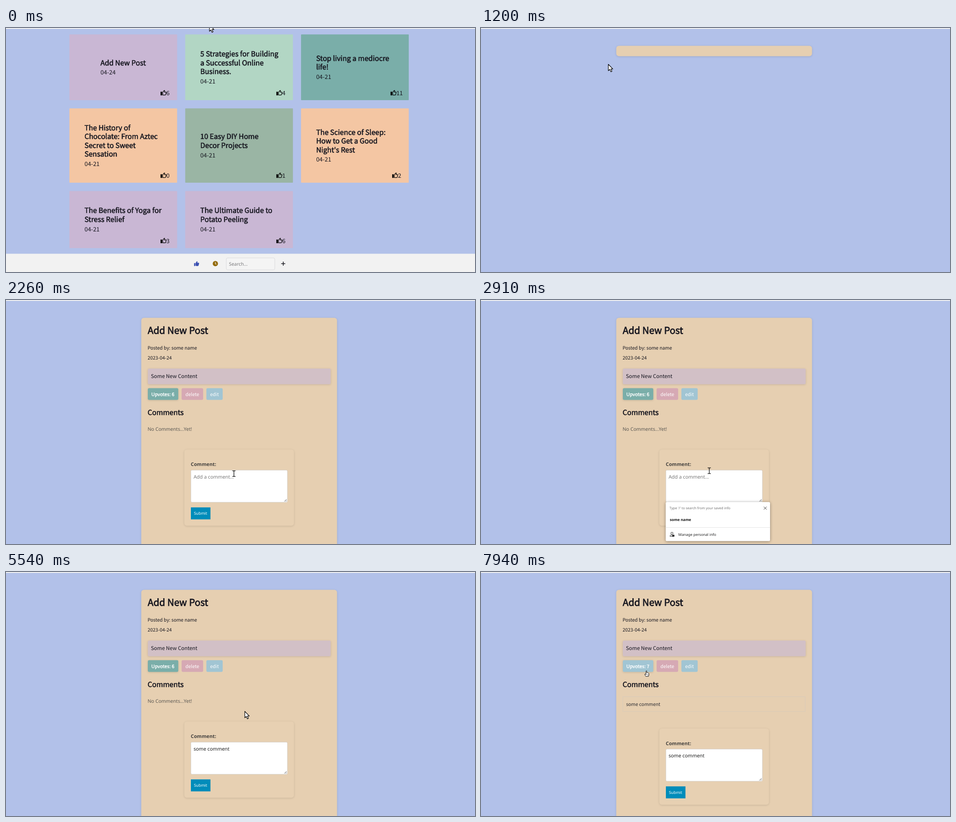
Recreate the animation shown at these times as an HTML page. Size 1035 by 541 pixels, loop 8 s.

```html
<!DOCTYPE html>
<html lang="en">
<head>
<meta charset="utf-8">
<title>Posts</title>
<style>
  html, body { margin: 0; width: 100%; height: 100%; overflow: hidden; background: #b2c1e9; }
  svg { display: block; width: 1035px; height: 541px; }
  text { white-space: pre; text-rendering: geometricPrecision; }
  .page { font-family: "Noto Sans CJK JP", "Noto Sans CJK SC", "Noto Sans JP", sans-serif; }
  .ui { font-family: "Noto Sans", "Open Sans", sans-serif; }
  .soft { filter: drop-shadow(0 1.5px 2px rgba(0, 0, 0, .13)); }
  .popup { filter: drop-shadow(0 1.5px 3px rgba(0, 0, 0, .4)); }
</style>
</head>
<body>
<svg id="stage" viewBox="0 0 1035 541"></svg>
<script>
const LOOP = 8000;
const INK = '#16161f';
const SHIFT = 15.5; // how far a posted comment pushes the form down

const rect = (x, y, w, h, fill, r = 0, extra = '') =>
  `<rect x="${x}" y="${y}" width="${w}" height="${h}" rx="${r}" fill="${fill}" ${extra}/>`;

const text = (x, y, size, str, { cls = 'page', fill = INK, extra = '' } = {}) =>
  `<text class="${cls}" x="${x}" y="${y}" font-size="${size}" fill="${fill}" ${extra}>${str}</text>`;

const heavy = (x, y, size, str, fill = INK, id = '') =>
  text(x, y, size, str, { fill, extra: `${id} stroke="${fill}" stroke-width="${size / 26}"` });

const ui = (x, y, size, str, fill, extra = '') => text(x, y, size, str, { cls: 'ui', fill, extra });

const group = (id, body, extra = '') => `<g id="${id}" ${extra}>${body}</g>`;

// ---------- overview page ----------

const rows = [[14.3, 145.8], [178.3, 164.8], [361.5, 126.4]];
const lavender = '#c9b7d4', mint = '#b2d6c4', teal = '#7aaea9', peach = '#f4c6a3', sage = '#9ab5a4';

const posts = [
  ['Add New Post', lavender, 6, '04-24'],
  ['5 Strategies for Building|a Successful Online|Business.', mint, 4],
  ['Stop living a mediocre|life!', teal, 11],
  ['The History of|Chocolate: From Aztec|Secret to Sweet|Sensation', peach, 0],
  ['10 Easy DIY Home|Decor Projects', sage, 1],
  ["The Science of Sleep:|How to Get a Good|Night's Rest", peach, 2],
  ['The Benefits of Yoga for|Stress Relief', lavender, 3],
  ['The Ultimate Guide to|Potato Peeling', lavender, 6],
];

const thumb = (x, y) => `<g transform="translate(${x} ${y})">
  <path d="M.3 4h3.4v8H.3z" fill="#000"/>
  <path d="M5 5.3 8.2 1.2Q9.6.7 9.5 2.2L8.7 4.8H12.2Q13 5 12.7 6L11 11.3H5Z"
    fill="none" stroke="#000" stroke-width="1.25" stroke-linejoin="round"/></g>`;

function postCard([title, color, likes, date = '04-21'], i) {
  const [y, h] = rows[Math.floor(i / 3)];
  const x = 139.9 + 255.6 * (i % 3);
  const lines = title.split('|');
  const mid = y + h / 2;
  const left = i ? x + 33.3 : 208.5;
  const first = mid - 4.5 - 9.75 * (lines.length - 1);
  const likeX = x + 211 - (13 + 7.2 * String(likes).length) / 2;
  const body = rect(x, y, 237.7, h, color, 1)
    + lines.map((s, n) => heavy(left, first + 19.5 * n, 15.6, s)).join('')
    + text(left, mid + 16.1 + 9.75 * (lines.length - 1), 13, date)
    + thumb(likeX, y + h - 22.8)
    + text(likeX + 13, y + h - 11.3, 13, likes);
  return group('card' + i, body, `data-cx="${x + 118.85}" data-cy="${mid}"`);
}

const toolbar = rect(0, 500.5, 1035, 40.5, '#f2f2f2')
  + `<path d="M415 521.2h2.6v6.5H415zM418.3 521.4 421 517.2Q423 517 422.6 518.8L422 520.6H425.3Q426.7 521 426 522.4
      L425 526.6Q424.6 527.7 423.4 527.7H420L418.3 526.8Z" fill="#3b50b2"/>`
  + '<circle cx="462" cy="522.4" r="5.8" fill="#936b0b"/>'
  + '<path d="M462 519v3.6l2.3 1.5" fill="none" stroke="#f2f2f2" stroke-width="1.2"/>'
  + rect(486.2, 509.8, 107, 26.4, '#f4f4f4', 3, 'stroke="#d3d3d6" stroke-width=".8"')
  + ui(492, 527.4, 10.4, 'Search...', '#77777a')
  + '<path d="M607.3 522.4h9M611.8 517.9v9" stroke="#15151c" stroke-width="1.5"/>';

const home = posts.map(postCard).join('') + toolbar
  + group('status', '<path d="M0 528H69Q71 528 71 530V541H0Z" fill="#448bca"/>'
    + ui(66.5, 538, 8, 'st:5173/details/75', '#16294a', 'text-anchor="end"'));

// ---------- detail page ----------

const form = '<g class="soft">' + rect(393.5, 331.5, 242, 169, '#e7d0b2', 6) + '</g>'
  + ui(407.8, 368.4, 10.8, 'Comment:', '#45423f', 'font-weight="700"')
  + rect(408, 377.2, 213, 71.2, '#fff', 2.5, 'stroke="#cfcbc6" stroke-width=".8"')
  + ui(413.9, 395.8, 10.8, '', '#1c1c1c', 'id="typed"')
  + rect(0, 384, 0.9, 14.5, '#000', 0, 'id="caret"')
  + '<path d="M614.3 446.8l5-5M617.3 446.8l2-2" stroke="#444" stroke-width=".9"/>'
  + rect(408, 459.8, 43.2, 26.6, '#008cba', 0, 'id="submit"')
  + ui(414.8, 476.4, 8.75, 'Submit', '#fff');

const popup = '<g class="popup">' + rect(407.6, 448, 230.3, 86.6, '#fff', 2.5) + '</g>'
  + ui(416, 464.2, 7.5, "Type '/' to search from your saved info", '#717171')
  + '<path d="M624 458.3l6.4 6.4M630.4 458.3l-6.4 6.4" stroke="#333" stroke-width="1"/>'
  + ui(416.7, 490.2, 8.15, 'some name', '#111', 'font-weight="700"')
  + rect(407.6, 504.2, 230.3, 0.8, '#dedede')
  + '<circle cx="421.4" cy="517.3" r="2.4" fill="none" stroke="#222"/>'
  + '<path d="M422 524.2H417.2Q416.6 520.9 421 521" fill="none" stroke="#222"/>'
  + rect(421.8, 520.4, 5, 4.4, '#222', 1)
  + ui(435.6, 523, 8.1, 'Manage personal info', '#222');

const content = heavy(312.8, 74.7, 20.8, 'Add New Post')
  + text(312.5, 109.5, 10.4, 'Posted by: some name')
  + text(312.5, 131.7, 10.4, '2023-04-24')
  + '<g class="soft">' + rect(313, 152, 403.5, 34.8, '#d2c0c6', 3) + '</g>'
  + text(319.8, 173, 11.44, 'Some New Content')
  + '<g class="soft">' + rect(313, 195.5, 67.2, 26, teal, 3, 'id="vote"') + '</g>'
  + heavy(320.7, 213, 10.4, '', '#fff', 'id="votes"')
  + rect(387.5, 195.5, 47.6, 26, '#d6a9b4', 3) + text(396, 213, 10.4, 'delete', { fill: '#fff' })
  + rect(442.2, 195.5, 36, 26, '#a1c5d3', 3) + text(450.6, 213, 10.4, 'edit', { fill: '#fff' })
  + heavy(312.6, 255, 15.6, 'Comments')
  + group('none', ui(312.4, 289.6, 10.65, 'No Comments...Yet!', '#5b5853'))
  + group('comment', rect(313, 276.6, 402.6, 32.6, 'none', 0, 'stroke="#d8cbbb" stroke-width=".9"')
    + text(320.2, 296.8, 10.4, 'some comment', { fill: '#2a2a30' }))
  + group('form', form)
  + group('popup', popup);

const detail = '<g class="soft">' + rect(298.5, 39.6, 432, 23, '#e6cfb1', 6, 'id="sheet"') + '</g>'
  + group('content', content);

// ---------- pointers ----------

const pointers = group('arrow',
    '<path d="M0 0V14.2L3.2 11.2 5.6 16.6 8 15.5 5.7 10.3H10Z" fill="#fff" stroke="#000" stroke-width="1.2" stroke-linejoin="round"/>')
  + group('beam', '<path d="M-3.5-6.3H-.8L0-5.5.8-6.3H3.5M0-5.5V5.5M-3.5 6.3H-.8L0 5.5.8 6.3H3.5" fill="none" stroke="#111" stroke-width="1.3"/>')
  + group('hand', `<path d="M-.9 1Q0-.4 .9 1V4.9Q1.8 4.2 2.6 5.1 3.5 4.6 4.2 5.6 5.4 5.4 5.5 6.8V9.6L4.5 13H-1.2L-3.8 8.7
      Q-3.8 7.3-2.3 7.9L-.9 9.2Z" fill="#fff" stroke="#111" stroke-width="1" stroke-linejoin="round"/>
      <path d="M1.2 8.3V11M2.6 8.3V11M4 8.3V11" stroke="#555" stroke-width=".6"/>`);

document.getElementById('stage').innerHTML = rect(0, 0, 1035, 541, '#b2c1e9')
  + group('home', home) + group('detail', detail) + rect(0, 0, 1035, 2, '#f1f1f1') + pointers;

// ---------- timeline: each entry holds until the next ----------

const moves = [
  [0, 'arrow', 449, -7], [250, 'hand', 451, 44], [390, 'hand', 436, 50], [520, 'hand', 398, 60],
  [650, 'hand', 330, 74], [780, 'hand', 281, 80], [1200, 'arrow', 281, 80.5],
  [1490, 'arrow', 300, 135], [1610, 'arrow', 372, 262], [1730, 'arrow', 470, 452],
  [1860, 'arrow', 526, 475], [1980, 'beam', 495, 422], [2130, 'beam', 490, 400],
  [2260, 'beam', 503, 385], [2410, 'beam', 503.7, 378.5], [5290, 'arrow', 512, 355],
  [5410, 'arrow', 523, 322], [5540, 'arrow', 527, 309], [5660, 'arrow', 520, 328],
  [5780, 'beam', 488, 394], [5910, 'arrow', 450, 450], [6030, 'hand', 432, 479],
  [6530, 'arrow', 423, 462], [6660, 'arrow', 402, 396], [6780, 'arrow', 376, 336],
  [6910, 'arrow', 362.8, 309.5], [7030, 'arrow', 383, 281], [7290, 'arrow', 376, 248],
  [7410, 'arrow', 368, 228], [7540, 'hand', 365, 218.5],
];

const typing = [
  [0, ''], [3170, 'so'], [3320, 'som'], [3450, 'some'], [3580, 'some c'], [3730, 'some con'],
  [4500, 'some co'], [4630, 'some com'], [4760, 'some comm'], [4900, 'some comme'], [5030, 'some comment'],
];

const cardHover = [[0, -1, 0], [390, 1, 1], [650, 0, .5], [780, 0, 1]];
const caretStates = [[0, 0], [2410, 1], [2910, 0], [3170, 1], [4240, 0], [4500, 1], [5030, 0]];
const voteColors = [[0, teal], [7540, '#8fbabf'], [7670, '#a1c5d3']];

const at = (track, t) => track.reduce((hit, step) => (t >= step[0] ? step : hit));
const el = id => document.getElementById(id);
const show = (id, on) => el(id).setAttribute('display', on ? 'inline' : 'none');

function draw(t) {
  const onHome = t < 1200, loaded = t >= 1340, posted = t >= 6410;
  show('home', onHome);
  show('detail', !onHome);
  show('content', loaded);
  show('status', t >= 920);

  const [, hovered, amount] = at(cardHover, t);
  posts.forEach((_, i) => {
    const k = i === hovered ? amount : 0;
    const card = el('card' + i);
    const { cx, cy } = card.dataset;
    card.setAttribute('opacity', 1 - .27 * k);
    card.setAttribute('transform', `translate(${cx} ${cy}) scale(${1 + .01 * k}) translate(${-cx} ${-cy})`);
  });

  el('sheet').setAttribute('height', loaded ? 530 : 23);
  show('none', !posted);
  show('comment', posted);
  el('form').setAttribute('transform', `translate(0 ${posted ? SHIFT : 0})`);
  show('popup', t >= 2410 && t < 5290);

  const words = at(typing, t)[1];
  const typed = el('typed');
  typed.textContent = words || 'Add a comment...';
  typed.setAttribute('fill', words ? '#1c1c1c' : '#777');
  const caretOn = at(caretStates, t)[1] === 1;
  show('caret', caretOn);
  if (caretOn) el('caret').setAttribute('x', 414 + (words ? typed.getComputedTextLength() : 0));

  el('submit').setAttribute('fill', t >= 6150 && t < 6530 ? '#007ba4' : '#008cba');
  el('vote').setAttribute('fill', at(voteColors, t)[1]);
  el('votes').textContent = 'Upvotes: ' + (t >= 7940 ? 7 : 6);

  const [, kind, x, y] = at(moves, t);
  for (const id of ['arrow', 'beam', 'hand']) show(id, id === kind);
  el(kind).setAttribute('transform', `translate(${x} ${y})`);
}

const start = performance.now();
function tick() {
  draw((performance.now() - start) % LOOP);
  requestAnimationFrame(tick);
}
tick();
</script>
</body>
</html>
```
